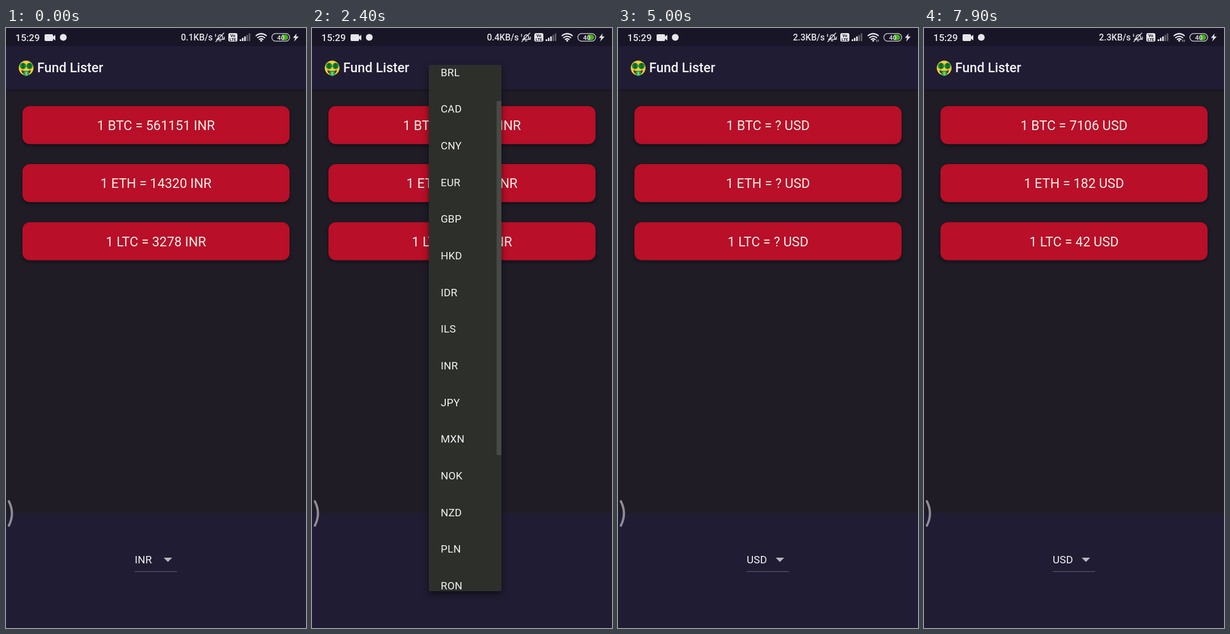
Animation of 529 by 1058 pixels, one loop 8000 ms. Source, as an HTML page:

```html
<!DOCTYPE html>
<html lang="en">
<head>
<meta charset="utf-8">
<title>Fund Lister</title>
<style>
  html, body { margin: 0; width: 100%; height: 100%; overflow: hidden; background: #1f1c26; }
  svg { display: block; width: 529px; height: 1058px; font-family: Roboto, sans-serif; fill: #fff; }
  .card rect { fill: #b90f28; filter: drop-shadow(0 3px 3px #0006); }
  .card text { font-size: 23.3px; text-anchor: middle; fill: #f5efe9; }
  .item { font-size: 18.6px; letter-spacing: .2px; fill: #f4f4f4; }
  .status { font-weight: 500; fill: #e6e5ea; }
  .bar { fill: #201c34; }
  .line { fill: none; stroke: #e6e5ea; stroke-linecap: round; }
  #panel { fill: #2d2f2a; filter: drop-shadow(0 5px 6px #0008); }
</style>
</head>
<body>
<svg viewBox="0 0 529 1058">
  <defs><clipPath id="clip"><rect id="clipBox" x="206" width="128" rx="2.5"/></clipPath></defs>
  <rect width="529" height="1058" fill="#1f1c26"/>
  <rect class="bar" y="32" width="529" height="76" style="filter:drop-shadow(0 2px 2px #0004)"/>
  <rect width="529" height="32" fill="#181526"/>
  <rect class="bar" y="855" width="529" height="203"/>

  <g class="status">
    <text x="16.5" y="22.5" font-size="17">15:29</text>
    <path d="M70 11h11q2 0 2 2v2l4-3v10l-4-3v2q0 2-2 2H70q-2 0-2-2v-8q0-2 2-2z"/>
    <circle cx="101" cy="16.5" r="6"/>
    <text id="speed" x="308.5" y="22" font-size="15.6"></text>
    <path class="line" stroke-width="1.5" d="M371 20h12M372.5 20q2-2 2-6a4 4 0 0 1 7 0q0 4 2 6M376 22.5h3M370 24L384 9M369.5 11v4M385 16v4"/>
    <rect x="392" y="9" width="16" height="15" rx="3"/>
    <g fill="#181526" font-size="7" font-weight="700" text-anchor="middle">
      <text x="400" y="15.7">Vo</text><text x="400" y="22.5">LTE</text>
    </g>
    <g id="signal"></g>
    <path class="line" stroke-width="2.2" d="M441 13.5q9-7 18 0M443.8 17q6.200-4.800 12.400 0M446.800 20.200q3.200-2.400 6.400 0"/>
    <circle cx="450" cy="22.5" r="1.7"/>
    <path id="arrows" class="line" stroke-width="1" d="M456 21v3M459 21v3"/>
    <rect x="468.7" y="9.7" width="31.500" height="13.600" rx="6.800" fill="none" stroke="#bdbbc6" stroke-width="1.5"/>
    <path d="M487 11.500h5.500a5 5 0 0 1 0 10H487z" fill="#45ad1c"/>
    <text x="484.500" y="20.600" font-size="11.500" text-anchor="middle">40</text>
    <path d="M512.500 9.500L506 17.500h4l-2 6.500 8-9h-4.500z"/>
  </g>

  <circle cx="35.500" cy="70.500" r="13" fill="#f3cf38"/>
  <path d="M27 74q8.500 4 17 0-1 8-8.500 8T27 74z" fill="#5a3412"/>
  <rect x="31" y="75.500" width="9.500" height="9" rx="3.500" fill="#21a047"/>
  <g fill="#168638"><ellipse cx="30" cy="67" rx="5.500" ry="5.800"/><ellipse cx="41.500" cy="67" rx="5.500" ry="5.800"/></g>
  <g fill="#0b4b1d" font-size="9" font-weight="700" text-anchor="middle">
    <text x="30" y="70.300">$</text><text x="41.500" y="70.300">$</text><text x="35.700" y="83" fill="#b6e7b5" font-size="8">$</text>
  </g>
  <text x="55" y="78" font-size="23.300" font-weight="500" fill="#f3f2f5">Fund Lister</text>

  <g id="cards"></g>

  <text id="choice" class="item" x="227" y="943.500"></text>
  <path d="M278 934h15l-7.500 7.500z" fill="#b9b8be"/>
  <path d="M227 958.500h74.500" stroke="#666270"/>

  <g id="menu">
    <rect id="panel" x="206" width="128" rx="2.500"/>
    <g clip-path="url(#clip)">
      <g id="list"></g>
      <rect id="thumb" x="325.500" width="8.500" fill="#c8c8c8"/>
    </g>
  </g>
  <path d="M5 834.500Q16 856 5 877.500" fill="none" stroke="#8f8c97" stroke-width="4" stroke-linecap="round"/>
</svg>
<script>
const LOOP = 8000, TOP = 65, HEIGHT = 928, ROW = 64.66, PAD = 10.8;
const OPEN = 1500, SCROLL = 2330, CLOSE = 4000, QUOTE = 7000;
const codes = 'AUD BRL CAD CNY EUR GBP HKD IDR ILS INR JPY MXN NOK NZD PLN RON RUB SEK SGD USD ZAR'.split(' ');
const coins = ['BTC', 'ETH', 'LTC'];
const quotes = { INR: [561151, 14320, 3278], USD: [7106, 182, 42] };
const content = codes.length * ROW + 2 * PAD, maxScroll = content - HEIGHT;
const thumbSize = HEIGHT * HEIGHT / content;

const $ = id => document.getElementById(id);
const clamp = v => Math.min(1, Math.max(0, v));
const ramp = (t, from, to) => clamp((t - from) / (to - from));
const mix = (a, b, u) => a + (b - a) * u;
const set = (el, attrs) => { for (const k in attrs) el.setAttribute(k, attrs[k]); };

$('signal').innerHTML = [0, 1, 2, 3, 4].map(i =>
  `<rect x="${412 + 4 * i}" y="${20 - 2.6 * i}" width="2.8" height="${3 + 2.6 * i}" opacity="${i < 3 ? 1 : .35}"/>`).join('');
$('cards').innerHTML = coins.map((c, i) => `<g class="card" transform="translate(0 ${102.4 * i})">
  <rect x="29" y="137.700" width="471" height="67" rx="13"/><text x="264.500" y="179.800"></text></g>`).join('');
$('list').innerHTML = codes.map((c, i) =>
  `<text class="item" x="227" y="${TOP + PAD + (i + .5) * ROW + 6.6}">${c}</text>`).join('');
const prices = document.querySelectorAll('.card text'), rows = [...$('list').children];

function drawMenu(t) {
  const shown = t >= OPEN && t < CLOSE + 300;
  $('menu').style.display = shown ? '' : 'none';
  if (!shown) return;

  const p = ramp(t, OPEN, OPEN + 300), closing = t > CLOSE + 50;
  const fade = t < CLOSE + 100 ? mix(1, .13, ramp(t, CLOSE, CLOSE + 100))
                               : mix(.13, 0, ramp(t, CLOSE + 100, CLOSE + 300));
  $('menu').setAttribute('opacity', clamp(p * 4) * fade);

  // The panel unfolds from the selected row, then its rows appear in turn.
  const grow = ramp(p, .25, .5), start = PAD + codes.indexOf('INR') * ROW;
  const box = { y: TOP + mix(start, 0, grow), height: mix(ROW, HEIGHT, grow) };
  set($('panel'), box);
  set($('clipBox'), box);
  const step = .5 / (codes.length + 1.5);
  rows.forEach((row, i) => {
    const from = .5 + (i + 1) * step;
    row.setAttribute('opacity', closing && i > 10 ? 0 : ramp(p, from, Math.min(1, from + 1.5 * step)));
  });

  const scroll = maxScroll * (1 - (1 - ramp(t, SCROLL, SCROLL + 600)) ** 1.87);
  $('list').setAttribute('transform', `translate(0 ${-scroll})`);
  set($('thumb'), {
    y: TOP + scroll / maxScroll * (HEIGHT - thumbSize),
    height: thumbSize,
    opacity: ramp(t, 2350, 2650)
  });
}

function draw(t) {
  const code = t < CLOSE ? 'INR' : 'USD';
  const waiting = t >= CLOSE && t < QUOTE;
  prices.forEach((el, i) => el.textContent = `1 ${coins[i]} = ${waiting ? '?' : quotes[code][i]} ${code}`);
  $('choice').textContent = code;
  $('speed').textContent = (t < 1600 ? '0.1' : t < 5000 ? '0.4' : '2.3') + 'KB/s';
  $('arrows').style.display = t < 5000 ? 'none' : '';
  drawMenu(t);
}

const begin = performance.now();
function tick() {
  draw((performance.now() - begin) % LOOP);
  requestAnimationFrame(tick);
}
tick();
</script>
</body>
</html>
```
